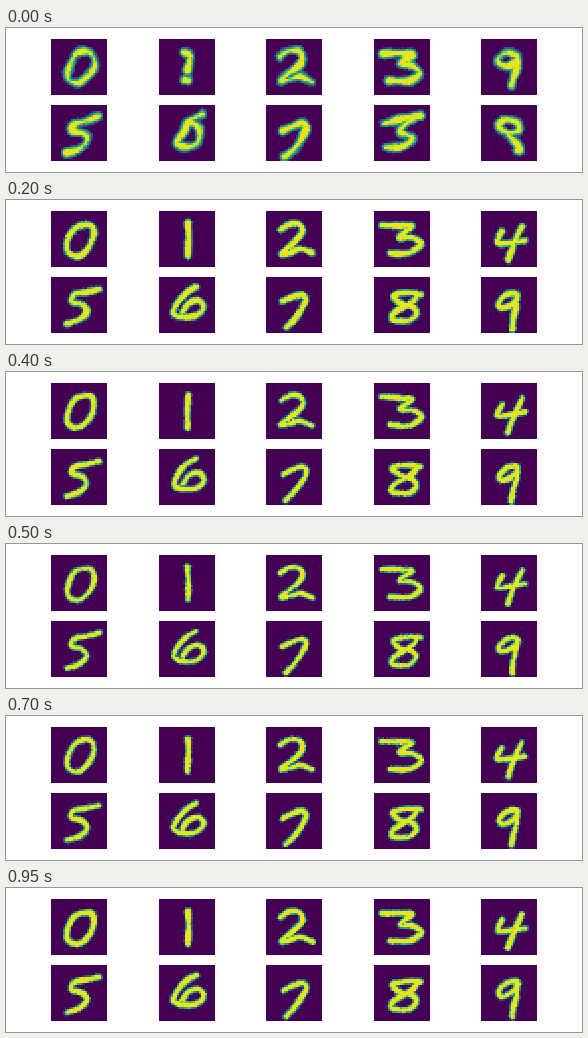
A matplotlib script that plays this animation: 576x144 px, repeating every 1 s.

```python
import numpy as np
import matplotlib.pyplot as plt
from matplotlib.animation import FuncAnimation

W, H, DPI = 576, 144, 72
FRAMES, INTERVAL = 20, 50
CELLS, SIDE = 28, 56
LEFTS, TOPS = (45, 153, 260, 368, 475), (11, 77)

# Pen strokes as x, y pairs in panel pixels, one group per digit.
ZERO = [[36, 13, 25, 16, 18, 27, 16, 38, 21, 44, 29, 44, 38, 36, 43, 25, 42, 16, 36, 13]]
ONE = [[29, 12, 29, 45]]
TWO = [[15, 18, 23, 13, 33, 13, 37, 20, 31, 29, 15, 42, 24, 41, 34, 38, 46, 42]]
THREE = [[8, 14, 28, 15, 38, 16, 26, 26, 39, 27, 47, 33, 40, 40, 31, 43, 16, 42]]
FOUR = [[21, 21, 17, 29, 19, 33, 44, 29], [41, 15, 36, 26, 31, 38, 27, 49]]
FIVE = [[48, 12, 37, 15, 23, 18, 21, 25, 31, 28, 36, 35, 29, 43, 16, 47]]
SIX = [[37, 10, 27, 16, 18, 27, 15, 36, 23, 40, 37, 39, 45, 31, 40, 24, 30, 27, 24, 35]]
SEVEN = [[17, 25, 25, 21, 36, 18, 40, 23, 36, 32, 28, 43, 20, 51]]
EIGHT = [[47, 17, 34, 16, 19, 19, 27, 27, 38, 30, 42, 37, 34, 44, 18, 43, 20, 36, 38, 25, 43, 18]]
NINE = [[36, 17, 26, 18, 18, 26, 20, 31, 28, 29, 36, 23, 36, 17], [36, 17, 35, 31, 32, 42, 31, 52]]
DIGITS = [ZERO, ONE, TWO, THREE, FOUR, FIVE, SIX, SEVEN, EIGHT, NINE]

# Opening guesses that still look like something else.
DRAFTS = {
    1: [[26, 14, 32, 18, 28, 31], [24, 41, 29, 42]],
    4: [[36, 16, 24, 14, 16, 22, 25, 27, 36, 20], [36, 16, 36, 30, 31, 45]],
    6: [[44, 8, 31, 16, 25, 28, 16, 38, 28, 42, 38, 36, 39, 22, 32, 17]],
    8: [[11, 18, 20, 16, 46, 11], [40, 15, 27, 26, 38, 33, 29, 42, 11, 42]],
    9: [[34, 18, 24, 16, 17, 22, 26, 28, 37, 25, 34, 18], [24, 27, 33, 36, 40, 45, 36, 46]],
}

axis = (np.arange(CELLS) + 0.5) * SIDE / CELLS
GX, GY = np.meshgrid(axis, axis)


def smooth(flat):
    """Dense Catmull-Rom curve through x, y pairs."""
    p = np.array(flat, float).reshape(-1, 2)
    closed = np.allclose(p[0], p[-1])
    before, after = (p[-2], p[1]) if closed else (p[0], p[-1])
    q = np.vstack([before, p, after])
    t = np.linspace(0, 1, 24)[:, None]
    return np.vstack([
        b + 0.5 * t * (c - a + t * (2*a - 5*b + 4*c - d + t * (3*(b - c) + d - a)))
        for a, b, c, d in zip(q, q[1:], q[2:], q[3:])])


def digit_image(digit, n):
    """Ink a digit with a pen that grows sharper and steadier with time."""
    rng = np.random.default_rng(100 * n + digit)
    rough = np.exp(-n / 2)
    strokes = DRAFTS.get(digit, DIGITS[digit]) if n == 0 else DIGITS[digit]
    ink = np.vstack([smooth(s) for s in strokes])

    # Sway the line and vary its weight, both with slow waves.
    phase = rng.uniform(0, 2 * np.pi, 4)
    ink = ink + (0.4 + 0.5 * rough) * np.sin(ink[:, ::-1] / 8 + phase[:2])
    weight = np.sin(GX / 4 + phase[2]) + np.sin(GY / 4 + phase[3])

    dist = np.hypot(GX[..., None] - ink[:, 0], GY[..., None] - ink[:, 1]).min(axis=-1)
    radius = 2.9 + rough + 0.25 * np.cos(2 * np.pi * (n - 5) / 12)
    radius = radius + (0.25 + 0.5 * rough) * weight + rng.normal(0, 0.25, dist.shape)
    softness = 2.4 + 1.8 * rough
    return 0.97 * np.clip((radius - dist) / softness + 0.5, 0, 1)


fig = plt.figure(figsize=(W / DPI, H / DPI), dpi=DPI, facecolor="white")
images = []
for top in TOPS:
    for left in LEFTS:
        ax = fig.add_axes([left / W, 1 - (top + SIDE) / H, SIDE / W, SIDE / H])
        ax.axis("off")
        images.append(ax.imshow(np.zeros((CELLS, CELLS)), cmap="viridis", vmin=0, vmax=1,
                                interpolation="nearest", aspect="auto"))


def update(n):
    for digit, image in enumerate(images):
        image.set_data(digit_image(digit, n))
    return images


anim = FuncAnimation(fig, update, frames=FRAMES, interval=INTERVAL, repeat=True, repeat_delay=0)
plt.show()
```
